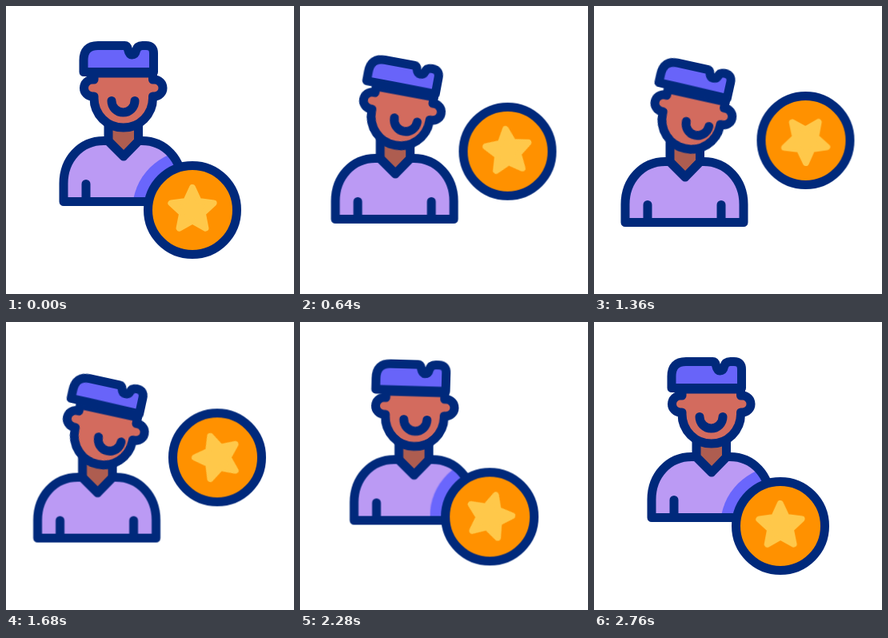
These frames come from a looping animation (360 by 360 pixels, 2.8 s). An HTML page:

```html
<!DOCTYPE html>
<html lang="en">
<head>
<meta charset="utf-8">
<title>Member with star coin</title>
<style>
  html, body { margin: 0; width: 100%; height: 100%; overflow: hidden; background: #fff; }
  svg { display: block; width: 100vw; height: 100vh; }
  .line { stroke: #00297b; stroke-width: 11; stroke-linecap: round; stroke-linejoin: round; }
  #head { transform-origin: 146px 152px; }
</style>
</head>
<body>
<svg viewBox="0 0 360 360">
  <defs>
    <path id="shirt" d="M72 244.5V222C72 192 93 168.5 122 168.5H127.5L147 188L166 168.5H170C199 168.5 220 192 220 222V244.5Z"/>
    <clipPath id="inShirt"><use href="#shirt"/></clipPath>
  </defs>

  <g id="person">
    <path class="line" fill="#ae5d50" d="M128 145V169L147 188L165.5 169V145Z"/>
    <use href="#shirt" fill="#bb9af4"/>
    <g clip-path="url(#inShirt)"><circle id="shade" cx="233" cy="255" r="75" fill="#6a66fc"/></g>
    <use href="#shirt" class="line" fill="none"/>
    <path class="line" d="M100 222.5V244M192 222.5V244"/>

    <g id="head" class="line">
      <path fill="#d36b5e" d="M110 84V92H108A10.5 10.5 0 0 0 108 113H110V115.3A36.75 36.75 0 0 0 183.5 115.3V113H185.5A10.5 10.5 0 0 0 185.5 92H183.5V84Z"/>
      <path id="mouth" fill="none" d="M132 118.5A14.5 14.5 0 0 0 161 118.5"/>
      <path id="hair" fill="#6864f9"/>
    </g>
  </g>

  <g id="coin">
    <g transform="translate(233 255)">
      <circle class="line" r="55.5" fill="#ff9100"/>
      <polygon id="star" fill="#ffc84a" stroke="#ffc84a" stroke-width="8" stroke-linejoin="round"/>
    </g>
  </g>
</svg>

<script>
const LOOP = 2800;
const GLIDE = 'cubic-bezier(.65, 0, .35, 1)';
const SOFT = 'cubic-bezier(.333, 0, .667, 1)';
const el = id => document.getElementById(id);
const move = (x, y) => ({ transform: `translate(${x}px, ${y}px)` });
const turn = deg => ({ transform: `rotate(${deg}deg)` });

el('star').setAttribute('points', Array.from({ length: 10 }, (_, i) => {
  const r = i % 2 ? 13.5 : 28;
  const a = (i / 5 - 0.5) * Math.PI;
  return `${(r * Math.cos(a)).toFixed(2)},${(r * Math.sin(a)).toFixed(2)}`;
}).join(' '));

// x, y: lowest point of the notch; left, right: height of the lower edge
function hair(x, y, left, right) {
  const top = 49.5;
  return { d: `path("M97 ${left} L97 68 Q97 ${top} 115 ${top} L${x - 9} ${top}
    Q${x - 6} ${top} ${x - 5} 54 Q${x - 3.5} ${y} ${x} ${y} Q${x + 4} ${y} ${x + 5} 56
    Q${x + 6.5} ${top} ${x + 13} ${top} L175 ${top} Q184.5 ${top} 184.5 59
    L184.5 ${right} Z")`.replace(/\s+/g, ' ') };
}

// steps: [time in ms, properties, easing to the next step]
function loop(id, steps) {
  const frames = steps.map(([ms, props, easing = 'linear']) =>
    ({ offset: ms / LOOP, easing, ...props }));
  const anim = el(id).animate(frames, { duration: LOOP, iterations: Infinity });
  anim.startTime = document.timeline.currentTime;
}

function outAndBack(id, rest, away) {
  loop(id, [
    [0, rest], [130, rest, GLIDE], [905, away],
    [1540, away, GLIDE], [2630, rest], [LOOP, rest]
  ]);
}

outAndBack('person', move(0, 0), move(-33, 26));
outAndBack('coin', move(0, 0), move(31.5, -87));
outAndBack('shade', move(0, 0), move(64.5, -113));
outAndBack('head', turn(0), turn(12.5));
outAndBack('mouth', move(0, 0), move(9, 0));
outAndBack('hair', hair(157.5, 61, 82.5, 82.5), hair(162, 58.5, 78.5, 79.5));

loop('star', [
  [0, turn(0)], [100, turn(0), SOFT],
  [1410, turn(180), SOFT], [LOOP, turn(360)]
]);
</script>
</body>
</html>
```
